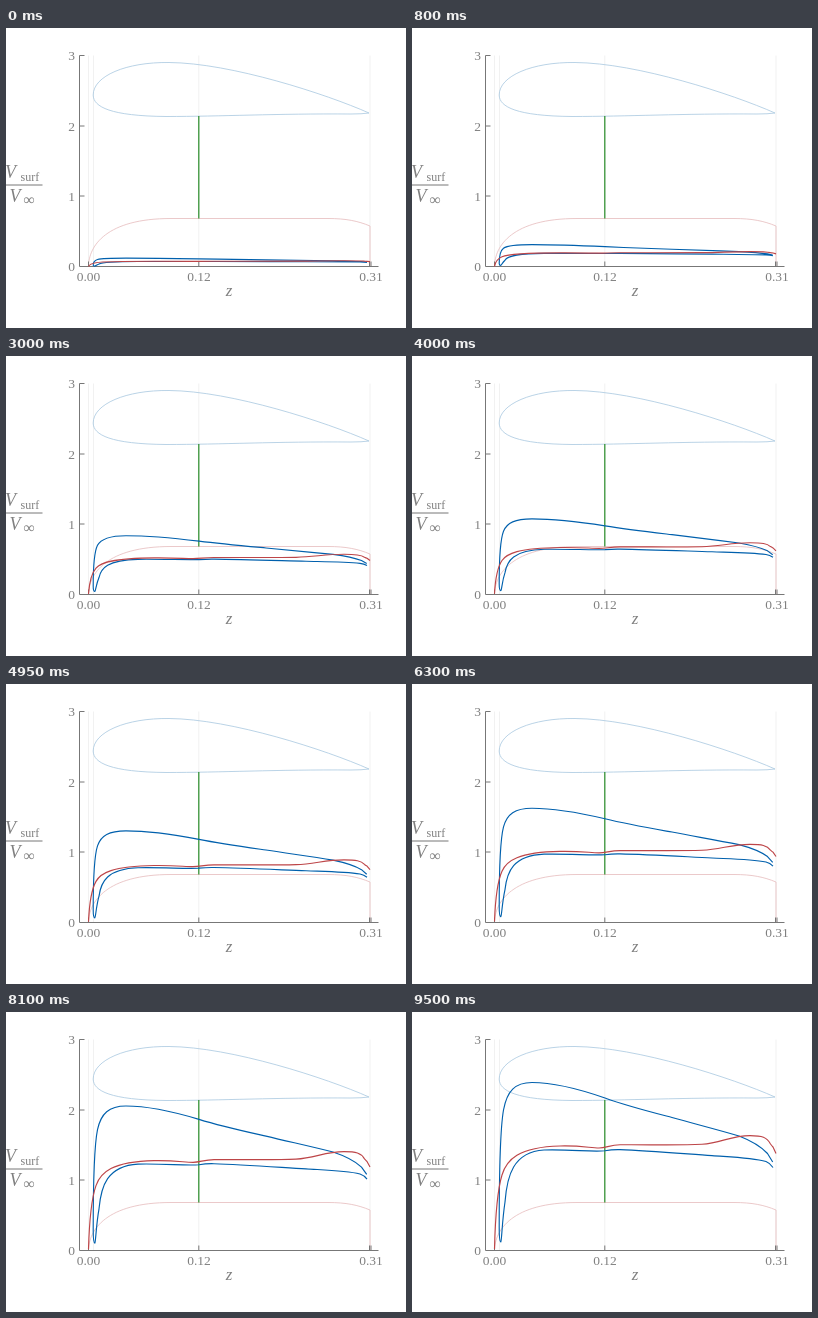
Recreate the animation shown at these times as an HTML page. Size 400x300 px, loop 9.55 s.

```html
<!DOCTYPE html>
<html lang="en">
<head>
<meta charset="utf-8">
<title>Surface velocity</title>
<style>
  html, body { margin: 0; width: 100%; height: 100%; overflow: hidden; background: #fff; }
  svg { display: block; width: 100vw; height: 100vh; }
  path { fill: none; }
  text { font: 13.5px "Liberation Serif", serif; fill: #808080; }
  .var { font-size: 18px; font-style: italic; }
  .sub { font-size: 12px; }
  .mid { text-anchor: middle; }
  .end { text-anchor: end; }
  .grid { stroke: #f1f1f1; stroke-width: 1; }
  .axis { stroke: #777; stroke-width: 1; }
  .foil { stroke: #a9c8e0; stroke-width: .8; }
  .body { stroke: #e6bcbd; stroke-width: .8; }
  .link { stroke: #2f8f2f; stroke-width: 1.25; }
  .curve { stroke-width: 1.15; stroke-linejoin: round; vector-effect: non-scaling-stroke; }
  .blue { stroke: #0060ad; }
  .red { stroke: #bd4548; }
</style>
</head>
<body>
<svg viewBox="0 0 400 300">
  <path class="grid" d="M82.5 27.5V238M87.5 27.5V238M192.8 27.5V238M364 27.5V238"/>
  <path class="foil" d="M363 85C320 66 225 35 163 34.5C120 34 87.2 48 87.2 67C87.2 79 105 88 160 88.5C215 88.5 270 85.5 345 86Q356 86 363 85"/>
  <path class="body" d="M82.5 238C83 218 100 190.5 165 190.5H322C340 190.5 352 193 364 198V238"/>
  <path class="link" d="M192.8 88V190.5"/>
  <path class="axis" d="M78.5 27.5H73.5V238.5H372.5M73.5 98H78.5M73.5 168H78.5M82.5 238V233.5M192.8 238V233.5M363.5 238V233.5M365 238V233.5"/>

  <g id="curves">
    <path class="curve blue" d="M360.7 150L355.5 141.5C349 134.5 340 129 327 124C305 117.5 285 112.5 260 105.5C235 99 215 94 193 86C170 78 145 70.5 120 70.5C103 70.5 95 79 91.5 98C88 118 87.2 175 87.2 215C87.2 225 88 230 88.8 230C89.8 228 90 210 93 190C95 164 101 140 132 138C160 137.3 178 140 193 138.8C198 137.8 202 137.4 208 137.6C235 138.5 270 141.5 300 143.6C320 145 340 145.5 354 149.5Q358 151 361 155.5"/>
    <path class="curve red" d="M82.5 237C83.3 205 86 176 90 163C94.5 148 106 135 148 134C170 133.5 178 136 187 136C194 136 198 133 208 132.8C235 132.5 265 133.5 290 132.3C309 131 319 123.6 338 123.6C350 123.6 355 125 358.5 132Q360 134 361 135L364 141.5"/>
  </g>

  <text class="end" x="69" y="32">3</text>
  <text class="end" x="69" y="102.5">2</text>
  <text class="end" x="69" y="172.5">1</text>
  <text class="end" x="69" y="243">0</text>
  <text class="mid" x="82.5" y="252.5">0.00</text>
  <text class="mid" x="193" y="252.5">0.12</text>
  <text class="mid" x="365" y="252.5">0.31</text>
  <text class="var mid" x="223" y="268" style="font-size:17px">z</text>
  <text class="var" x="-1" y="149.5">V</text>
  <text class="sub" x="14.5" y="152.5">surf</text>
  <path class="axis" d="M0 157H36.5"/>
  <text class="var" x="3.5" y="173.5">V</text>
  <text class="sub" x="17.5" y="176.5" style="font-size:16px">∞</text>
</svg>
<script>
  const BASE = 238.5, STEP = 50, STEPS = 191;
  const curves = document.getElementById("curves");
  const start = performance.now();

  // Both curves grow linearly from 5% to full height.
  function draw() {
    const step = Math.floor((performance.now() - start) / STEP) % STEPS;
    const scale = 0.05 + 0.005 * step;
    curves.setAttribute("transform", `matrix(1 0 0 ${scale} 0 ${BASE * (1 - scale)})`);
    requestAnimationFrame(draw);
  }
  draw();
</script>
</body>
</html>
```
